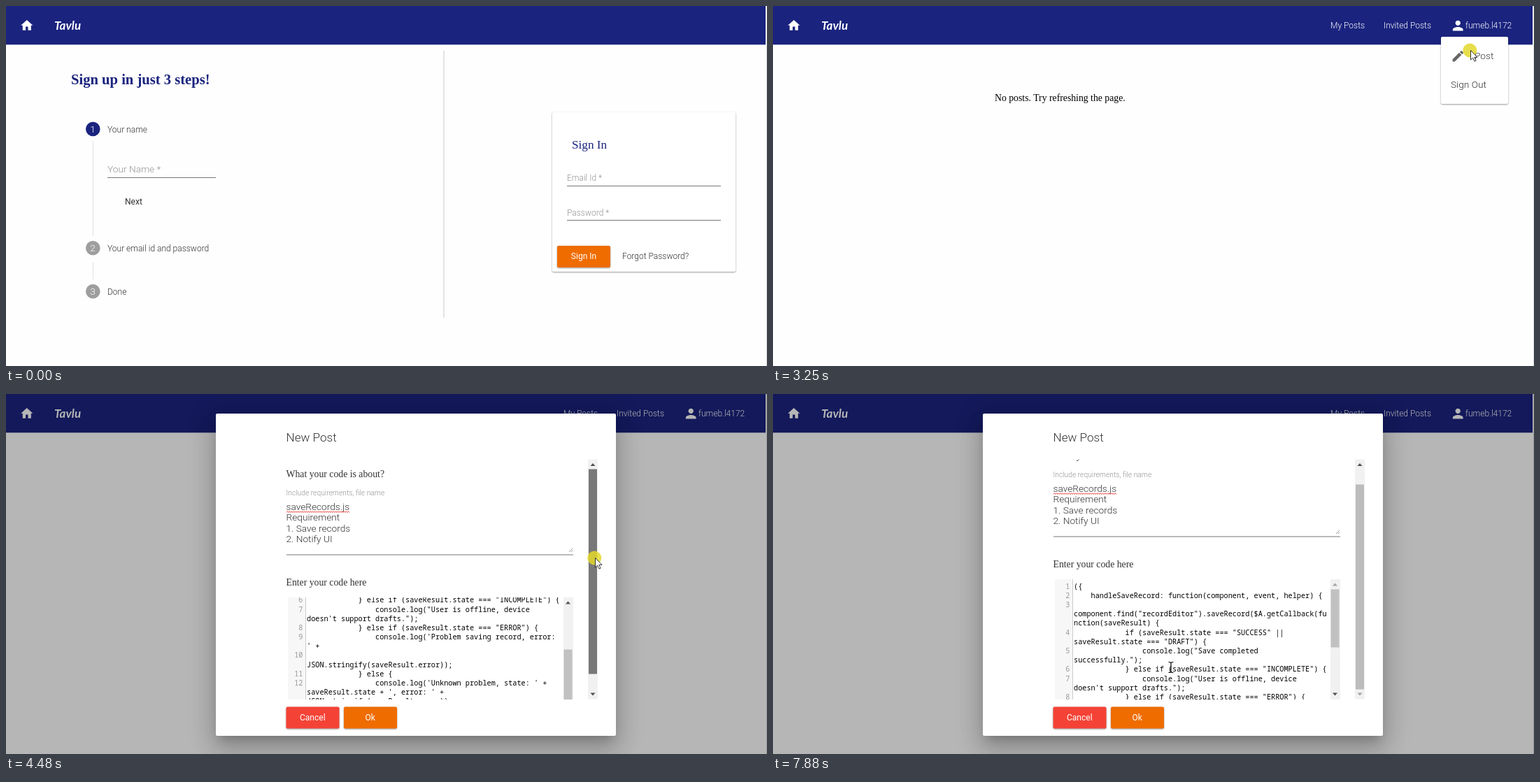
These frames come from a looping animation (1088 by 515 pixels, 8 s). An HTML page:

```html
<!DOCTYPE html>
<html lang="en">
<head>
<meta charset="utf-8">
<title>Code sharing demo</title>
<style>
html, body { margin: 0; width: 1088px; height: 515px; overflow: hidden; background: #fefefe; }
#stage { position: relative; width: 1088px; height: 515px; overflow: hidden; contain: strict; }
svg { position: absolute; left: 0; top: 0; display: block; overflow: hidden; }
text { font: 300 12px Roboto, sans-serif; fill: #333; white-space: pre; }
.mid { font-size: 13.7px; }
.big { font-size: 17.1px; }
.small { font-size: 10.3px; }
.serif { font: 13.75px "Liberation Serif", serif; }
.mono { font: 10.23px "Noto Sans Mono", monospace; fill: #000; }
.num { fill: #999; text-anchor: end; }
.hint { fill: #949494; }
.light { fill: #fff; }
.c { text-anchor: middle; }
.line { fill: none; stroke: #777; }
.rule { fill: none; stroke: #e0e0e0; }
.raised { filter: drop-shadow(0 1px 1px rgba(0, 0, 0, .4)); }
.track { fill: #f1f1f1; }
.thumb { fill: #c1c1c1; }
#dialog {
  position: absolute; left: 300.3px; width: 572px; background: #fff; border-radius: 2px; overflow: hidden;
  box-shadow: 0 9px 13px -6px rgba(0,0,0,.2), 0 20px 32px 2px rgba(0,0,0,.14), 0 8px 39px 7px rgba(0,0,0,.12);
}
</style>
</head>
<body>
<div id="stage">
<svg width="1088" height="515" viewBox="0 0 1088 515">
  <defs><clipPath id="item"><rect x="955" y="51" width="96" height="41"/></clipPath></defs>
  <rect width="1088" height="515" fill="#fefefe"/>
  <path class="rule" d="M1087.5 0V515" style="stroke:#d8d8d8"/>
  <rect width="1086" height="55.3" fill="#1a237e"/>
  <path class="light" transform="translate(19.5 17.5) scale(.86)" d="M10 20v-6h4v6h5v-8h3L12 3 2 12h3v8z"/>
  <text class="light" x="69" y="34" style="font:italic 700 17px Lato,sans-serif">Tavlu</text>

  <g id="home">
    <text x="93" y="112" style="font:bold 20.6px 'Liberation Serif',serif;fill:#1a237e">Sign up in just 3 steps!</text>
    <path class="rule" d="M124.5 193V329M124.5 367V391"/>
    <path class="rule" d="M626 64V446" style="stroke:#ddd;stroke-width:1.6"/>
    <circle cx="124.3" cy="176" r="10.3" fill="#1a237e"/>
    <circle cx="124.3" cy="346.3" r="10.3" fill="#9e9e9e"/>
    <circle cx="124.3" cy="408.3" r="10.3" fill="#9e9e9e"/>
    <text class="mid light c" x="124" y="181">1</text>
    <text class="mid light c" x="124" y="351">2</text>
    <text class="mid light c" x="124" y="413">3</text>
    <text x="145" y="181">Your name</text>
    <text x="145" y="351">Your email id and password</text>
    <text x="145" y="413">Done</text>
    <text class="mid hint" x="145" y="238">Your Name *</text>
    <path class="line" d="M145 245.5H300"/>
    <text x="170" y="284" style="font-weight:400">Next</text>

    <rect class="raised" x="781" y="152" width="262" height="228" rx="2" fill="#fff"/>
    <text class="serif" x="809" y="204" style="font-size:17.2px;fill:#1a237e">Sign In</text>
    <text class="hint" id="mailLabel" x="802">Email Id *</text>
    <text id="mail" x="802" y="250"></text>
    <path class="line" id="mailLine" d="M802 257.5H1022"/>
    <text class="hint" id="passLabel" x="802">Password *</text>
    <text id="pass" x="802" y="300"></text>
    <path class="line" id="passLine" d="M802 306.5H1022"/>
    <rect class="raised" x="788" y="343" width="76" height="31" rx="2" fill="#ef6c00"/>
    <text class="light c" x="826" y="362" style="font-weight:400">Sign In</text>
    <text x="881" y="362">Forgot Password?</text>
  </g>

  <g id="posts">
    <text class="light" x="797" y="32">My Posts</text>
    <text class="light" x="873" y="32">Invited Posts</text>
    <path class="light" transform="translate(968.2 17) scale(.92)" d="M12 12c2.21 0 4-1.79 4-4s-1.79-4-4-4-4 1.79-4 4 1.79 4 4 4zm0 2c-2.67 0-8 1.34-8 4v2h16v-2c0-2.66-5.33-4-8-4z"/>
    <text class="light" x="990" y="32">fumeb.l4172</text>
    <text class="serif" x="317" y="136" style="fill:#000">No posts. Try refreshing the page.</text>
  </g>

  <g id="status">
    <rect x="-3" y="502.5" width="360" height="20" rx="3" fill="#f1f1f1" stroke="#dcdcdc"/>
    <text x="-8" y="517" style="font:9.8px 'Open Sans',sans-serif;fill:#666">Waiting for www.googleapis.com</text>
  </g>

  <g id="menu">
    <rect class="raised" x="955" y="44" width="96" height="96" rx="2" fill="#fff"/>
    <g clip-path="url(#item)"><circle id="ripple" cx="997" cy="72" fill="#000" opacity=".14"/></g>
    <path transform="translate(969 61.5) scale(.86)" fill="#666" d="M3 17.25V21h3.75L17.81 9.94l-3.75-3.75zM20.71 7.04a1 1 0 0 0 0-1.41l-2.34-2.34a1 1 0 0 0-1.41 0l-1.83 1.83 3.75 3.75z"/>
    <text class="mid" x="1003" y="76">Post</text>
    <text class="mid" x="969" y="117">Sign Out</text>
  </g>
  <rect id="shade" width="1088" height="515"/>
</svg>

<div id="dialog">
  <svg id="content" width="572" height="461" viewBox="300 0 572 461">
    <defs>
      <clipPath id="view"><rect x="300" y="65" width="572" height="344"/></clipPath>
      <clipPath id="codeBox"><rect id="codeClip" x="403" y="223" width="408"/></clipPath>
      <path id="up" d="M-3.5 2L0-2 3.5 2z"/>
      <path id="down" d="M-3.5-2L0 2 3.5-2z"/>
      <path id="grip" d="M-5 0L0-5M-2 0L0-2" stroke="#999" fill="none"/>
    </defs>
    <text class="big" x="400.5" y="40">New Post</text>
    <g clip-path="url(#view)"><g id="body">
      <text class="serif" x="400.5" y="90.5">What your code is about?</text>
      <text class="mid hint" id="prompt" x="400.5" y="138">Include requirements, file name</text>
      <g id="note">
        <text class="small hint" x="400.5" y="117">Include requirements, file name</text>
        <g id="noteText"></g>
      </g>
      <g id="lower">
        <path class="line" id="noteLine"/>
        <use href="#grip" id="noteGrip" y="158"/>
        <text class="serif" x="400.5" y="206">Enter your code here</text>
        <g clip-path="url(#codeBox)">
          <rect id="gutter" x="403" y="223" width="25" fill="#f7f7f7"/>
          <path class="rule" id="gutterLine" style="stroke:#ccc"/>
          <g id="code"></g>
        </g>
        <g id="codeBar">
          <rect class="track" x="797" y="223" width="14" height="172"/>
          <rect class="thumb" id="codeThumb" x="797.5" width="12" height="83"/>
          <use href="#up" id="codeUp" x="803.5" y="230.5"/>
          <use href="#down" id="codeDown" x="803.5" y="387.5"/>
        </g>
      </g>
    </g></g>
    <g id="bodyBar">
      <rect class="track" x="832" y="65.5" width="14" height="343"/>
      <rect class="thumb" id="bodyThumb" x="833" width="12" height="293"/>
      <use href="#up" x="839" y="73" fill="#505050"/>
      <use href="#down" id="bodyDown" x="839" y="401.5"/>
    </g>
    <g id="buttons">
      <rect class="raised" x="400.5" width="76" height="31" rx="2" fill="#f44336"/>
      <rect class="raised" id="ok" x="483" width="76" height="31" rx="2"/>
      <text class="light c" x="438.3" y="19.5" style="font-weight:400">Cancel</text>
      <text class="light c" x="520.7" y="19.5" style="font-weight:400">Ok</text>
    </g>
  </svg>
</div>

<svg width="1088" height="515" viewBox="0 0 1088 515">
  <g id="cursor">
    <circle id="halo" cx="-.7" cy=".5" r="10" fill="#e3d82c" opacity=".85"/>
    <path id="arrow" d="M.5.5V14l3.1-2.8 2.3 5 2.2-1-2.3-4.8h4.2z" fill="#fff" stroke="#222" stroke-width=".9"/>
    <path id="beam" d="M-3.5-7.5Q0-7.5 0-6Q0-7.5 3.5-7.5M0-6V6M-3.5 7.5Q0 7.5 0 6Q0 7.5 3.5 7.5" fill="none" stroke="#000" stroke-width="1.2"/>
  </g>
</svg>
</div>

<script>
const LOOP = 8000, STEP = 77.3, ROW = 13.18, CODE_SCROLL = 125;
const MAIL = 'fumeb.l4172@inbox.test', PASS = '•'.repeat(9);
const NOTE = ['saveRecords.js', 'Requirement', '1. Save records', '2. Notify UI'];

// Each entry is a numbered line; "\n" marks a soft wrap.
const CODE = [
  '({',
  '    handleSaveRecord: function(component, event, helper) {',
  '\ncomponent.find("recordEditor").saveRecord($A.getCallback(fu\nnction(saveResult) {',
  '            if (saveResult.state === "SUCCESS" ||\nsaveResult.state === "DRAFT") {',
  '                console.log("Save completed\nsuccessfully.");',
  '            } else if (saveResult.state === "INCOMPLETE") {',
  '                console.log("User is offline, device\ndoesn\'t support drafts.");',
  '            } else if (saveResult.state === "ERROR") {',
  '                console.log(\'Problem saving record, error:\n\' +',
  '\nJSON.stringify(saveResult.error));',
  '            } else {',
  '                console.log(\'Unknown problem, state: \' +\nsaveResult.state + \', error: \' +\nJSON.stringify(saveResult.error));',
  '            }',
  '        }));'
];

// time, x, y
const POINTER = [
  [0, 870, 525], [80, 868, 510], [310, 850, 250], [930, 850, 250], [1010, 842, 296],
  [1330, 842, 296], [1480, 820, 370], [1620, 820, 372], [1700, 709, 371], [1850, 613, 348],
  [2400, 613, 348], [2800, 1015, 24], [2950, 1015, 24], [3170, 997, 63], [3500, 997, 63],
  [3860, 700, 190], [4000, 686, 183], [4035, 686, 183], [4180, 600, 245], [4330, 620, 340],
  [4460, 842, 234], [4500, 842, 234], [4860, 832, 256], [5030, 832, 256], [5190, 831, 259],
  [5410, 831, 261], [5780, 831, 261], [5870, 802, 307], [5900, 802, 307], [6040, 602, 413],
  [6320, 602, 413], [6400, 575, 335], [6570, 539, 428], [6780, 539, 428], [6950, 524, 450],
  [7050, 530, 460], [7340, 569, 391]
];
const CLICKS = [[300, 400], [1000, 1080], [1480, 1620], [2800, 2920], [3240, 3330], [4440, 5630]];
const BEAMS = [[300, 1350], [4090, 4400], [5900, LOOP]];
// time, dialog opacity, content opacity, scale, centre y
const OPENING = [[3400, 0, .4, .85, 283.4], [3490, .62, .67, .967, 283.4], [3560, 1, 1, 1, 283], [3640, 1, 1, 1, 258]];

const $ = id => document.getElementById(id);
const set = (id, attrs) => { for (const k in attrs) $(id).setAttribute(k, attrs[k]); };
const show = (id, on) => { $(id).style.display = on ? '' : 'none'; };
const within = (t, ranges) => ranges.some(([a, b]) => t >= a && t < b);
const arrowTint = end => end ? '#a3a3a3' : '#505050';

function track(keys, t) {
  if (t <= keys[0][0]) return keys[0].slice(1);
  const i = keys.findIndex(k => k[0] > t);
  if (i < 0) return keys[keys.length - 1].slice(1);
  const a = keys[i - 1], b = keys[i], p = (t - a[0]) / (b[0] - a[0]);
  return a.slice(1).map((v, j) => v + (b[j + 1] - v) * p);
}

function addText(parent, x, y, cls, str) {
  const el = document.createElementNS('http://www.w3.org/2000/svg', 'text');
  el.setAttribute('x', x);
  el.setAttribute('y', y);
  el.setAttribute('class', cls);
  el.textContent = str;
  $(parent).append(el);
}

function build() {
  let row = 0;
  CODE.forEach((line, n) => line.split('\n').forEach((part, i) => {
    const y = 236.7 + ROW * row++;
    if (!i) addText('code', 424.5, y, 'mono num', n + 1);
    addText('code', 430, y, 'mono', part);
  }));
  NOTE.forEach((s, i) => addText('noteText', 400.5, 137.8 + 15.4 * i, 'mid', s));
  $('noteText').insertAdjacentHTML('beforeend',
    `<path d="M401 141.5${'l1.5-1.8 1.5 1.8'.repeat(30)}" fill="none" stroke="#e53935" stroke-width=".9"/>`);
}

function field(name, value, t, focus, type, blur, y) {
  const up = t >= focus, on = up && t < blur;
  const count = Math.round(value.length * track([[type[0], 0], [type[1], 1]], t)[0]);
  $(name).textContent = value.slice(0, count);
  set(name + 'Label', { y: up ? y - 17 : y });
  $(name + 'Label').style.cssText = up ? `font-size:9px;fill:${on ? '#1a237e' : '#949494'}` : '';
  $(name + 'Line').style.cssText = on ? 'stroke:#1a237e;stroke-width:2' : '';
}

function drawDialog(t) {
  const [opacity, ink, scale, cy] = track(OPENING, t);
  const noted = t >= 4170, coded = t >= 4330;
  const grow = noted ? 40 : 0, codeH = coded ? 172 : 20;
  const height = Math.min(461, 274 + grow + codeH);
  const scroll = track([[4500, 0], [4860, 26]], t)[0];
  const codeScroll = coded ? track([[7665, CODE_SCROLL], [7896, 0]], t)[0] : 0;
  const right = coded ? 811 : 826;

  Object.assign($('dialog').style, {
    display: opacity ? '' : 'none', opacity,
    top: cy - height / 2 + 'px', height: height + 'px', transform: `scale(${scale})`
  });
  set('content', { opacity: ink });
  show('prompt', !noted);
  show('note', noted);
  show('codeBar', coded);
  show('bodyBar', coded);
  set('body', { transform: `translate(0 ${-scroll})` });
  set('lower', { transform: `translate(0 ${grow})` });
  set('noteLine', { d: `M401 162H${right}` });
  set('noteGrip', { x: right - 1 });
  set('codeClip', { height: codeH });
  set('gutter', { height: codeH });
  set('gutterLine', { d: `M428.5 223v${codeH}` });
  set('code', { transform: `translate(0 ${-codeScroll})` });
  for (const el of $('code').children) el.style.display = coded || el === $('code').firstChild ? '' : 'none';
  set('codeThumb', { y: 237.5 + codeScroll * 60 / CODE_SCROLL });
  set('codeUp', { fill: arrowTint(codeScroll <= 0) });
  set('codeDown', { fill: '#505050' });
  set('bodyThumb', { y: 79.5 + scroll * 22 / 26 });
  $('bodyThumb').style.fill = t < 4440 || t >= 5760 ? '#bcbcbc' : t < 5630 ? '#787878' : '#a8a8a8';
  set('bodyDown', { fill: arrowTint(scroll >= 26) });
  set('buttons', { transform: `translate(0 ${height - 41.5})` });
  set('ok', { fill: t < 4090 ? '#d46000' : '#ef6c00' });
}

function draw(time) {
  const t = Math.floor((time + 16) / STEP) * STEP + 12;
  const signedIn = t >= 2050;
  show('home', !signedIn);
  show('posts', signedIn);
  show('status', signedIn && t < 2405);
  show('menu', t >= 2930 && t < 3600);
  set('menu', { opacity: track([[3400, 1], [3490, .76], [3600, 0]], t)[0] });
  field('mail', MAIL, t, 310, [380, 860], 1000, 250);
  field('pass', PASS, t, 1000, [1050, 1350], 1500, 300);
  set('ripple', { r: track([[3250, 0], [3490, 46], [3600, 70]], t)[0] });
  set('shade', { opacity: track([[3330, 0], [3490, .18], [3640, .288]], t)[0] });
  drawDialog(t);

  const [x, y] = track(POINTER, t);
  const beam = within(t, BEAMS) && y < 437;
  set('cursor', { transform: `translate(${x} ${y})` });
  show('halo', within(t, CLICKS));
  show('beam', beam);
  show('arrow', !beam);
}

function tick() {
  draw(performance.now() % LOOP);
  requestAnimationFrame(tick);
}

build();
tick();
</script>
</body>
</html>
```
